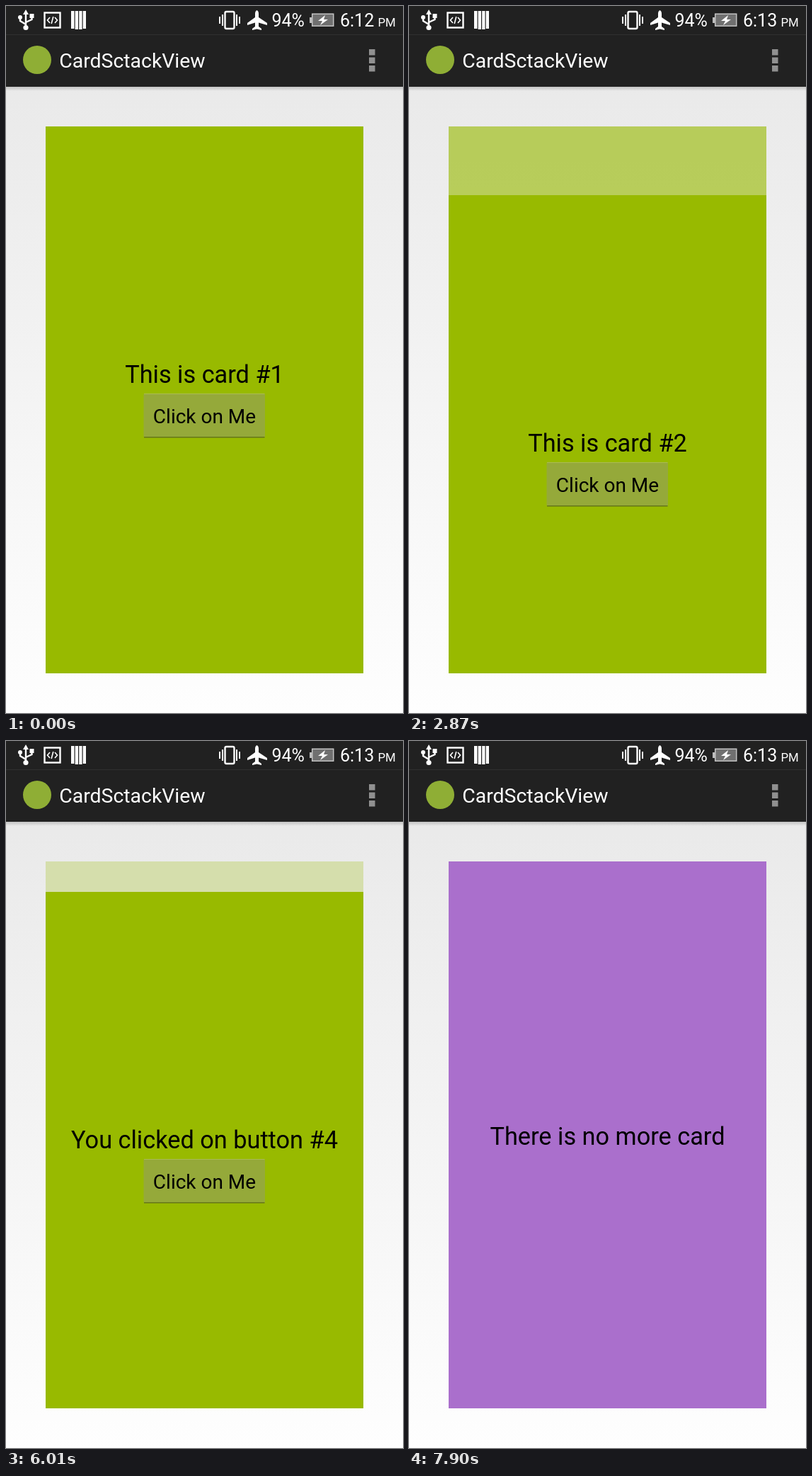
An HTML page for the animation above (9.15 s loop, 561 by 998 pixels).

```html
<!DOCTYPE html>
<html lang="en">
<head>
<meta charset="utf-8">
<title>Card stack</title>
<style>
  html, body { margin: 0; width: 100%; height: 100%; overflow: hidden; background: #fff; }
  svg { display: block; width: 561px; height: 998px; font-family: Roboto, "Noto Sans", sans-serif; }
  .label { font-size: 34.3px; text-anchor: middle; }
  .caption { font-size: 28px; text-anchor: middle; }
  .line { fill: none; stroke: #fff; stroke-width: 2.4; }
</style>
</head>
<body>
<svg viewBox="0 0 561 998">
  <defs>
    <linearGradient id="page" x2="0" y2="1">
      <stop stop-color="#e7e7e7"/><stop offset="1" stop-color="#fefefe"/>
    </linearGradient>
    <linearGradient id="shade" x2="0" y2="1">
      <stop stop-opacity=".17"/><stop offset="1" stop-opacity="0"/>
    </linearGradient>
    <clipPath id="stack"><rect x="56" y="170" width="449" height="772"/></clipPath>
    <g id="card">
      <rect x="56" y="170" width="449" height="772" fill="#98ba00"/>
      <text class="label" x="280.5" y="532"></text>
      <rect class="button" x="194.5" y="547" width="171.5" height="62" rx="2" fill="#95a93a"/>
      <path d="M195 547.5H365.5" stroke="#aabb55"/>
      <path d="M195 608.7H365.5" stroke="#66761c" stroke-width="1.4"/>
      <text class="caption" x="280.5" y="589">Click on Me</text>
    </g>
  </defs>

  <rect width="561" height="998" fill="url(#page)"/>
  <rect y="114" width="561" height="6" fill="url(#shade)"/>
  <rect width="561" height="114" fill="#212121"/>
  <path d="M0 40.5H561" stroke="#303030"/>

  <g fill="#fff">
    <!-- left status icons -->
    <path class="line" d="M28 10V29M28 26L20 21V17M28 23L36.5 19V14"/>
    <path d="M28 5L32 12H24ZM33.5 11H39.5V17H33.5Z"/>
    <circle cx="28" cy="30.500" r="3.6"/><circle cx="20" cy="16" r="3"/>
    <rect class="line" x="54.5" y="9.5" width="22" height="21"/>
    <path class="line" style="stroke-width:1.6" d="M62 16L58.5 20L62 24M69 16L72.5 20L69 24M66.8 15L64.2 25"/>
    <path d="M92 7H96.5V32H92ZM97.7 7H102V33H97.7ZM103.2 7H107.5V33H103.2ZM108.7 7H113V32H108.7Z"/>
    <!-- right status icons -->
    <rect class="line" x="309.5" y="8" width="13" height="24" rx="2"/>
    <path class="line" style="stroke-width:2" d="M302 15V25M306 12V28M326 12V28M330 15V25"/>
    <path d="M354.5 6Q357 7 357 11V16L369 24V27L357 23.500V29L361 32V34L354.5 32.5L348 34V32L352 29V23.5L341 27V24L352 16V11Q352 7 354.5 6Z"/>
    <path d="M429 16H432V24H429Z" fill="#bbb"/>
    <rect x="432.7" y="11.2" width="30" height="17" fill="#707070" stroke="#c4c4c4" stroke-width="1.5"/>
    <path d="M451 13L441 21H447L444 27L455 19H449Z"/>
    <g font-size="25">
      <text x="375.5" y="29">94%</text>
      <text id="clock" x="472" y="29">6:12</text>
      <text x="525.5" y="29" font-size="16.8">PM</text>
    </g>
    <!-- action bar -->
    <circle cx="44" cy="76" r="20" fill="#8fae35"/>
    <text x="75.3" y="87" font-size="28.4">CardSctackView</text>
    <path fill="#909090" d="M513 61H521.5V69.5H513ZM513 72.5H521.5V81H513ZM513 84H521.5V92.5H513Z"/>
  </g>

  <g clip-path="url(#stack)" id="cards"></g>
  <g id="empty">
    <rect x="56" y="170" width="449" height="772" fill="#aa6fcc"/>
    <text class="label" x="280.5" y="569.5">There is no more card</text>
  </g>
</svg>
<script>
const LOOP = 9150, HEIGHT = 772, SETTLE = 300, FADE = 158;
const CLOCK = 2430, PRESS = 4620, CLICK = 4750, EMPTY = 7870;
// start, end of the swipe and the distance dragged before release
const swipes = [
  [1590, 2480, 200],
  [2670, 3340, 274],
  [3580, 4460, 135],
  [5780, 6650, 200],
  [6990, 7850, 200]
];
const byId = id => document.getElementById(id);
const template = byId('card');

function makeCard() {
  const node = template.cloneNode(true);
  node.removeAttribute('id');
  byId('cards').append(node);
  return { node, label: node.querySelector('.label'), button: node.querySelector('.button') };
}
const back = makeCard(), front = makeCard();

function offsetAt(t, [start, end, reach]) {
  const release = end - SETTLE;
  if (t <= start) return 0;
  if (t < release) return reach * ((t - start) / (release - start)) ** 1.7;
  const u = Math.min(1, (t - release) / SETTLE);
  return reach + (HEIGHT - reach) * (1 - Math.cos(Math.PI * u)) / 2;
}

function fill(card, index, t) {
  const clickable = index === 3;
  card.label.textContent = clickable && t >= CLICK
    ? 'You clicked on button #4' : `This is card #${index + 1}`;
  card.button.setAttribute('fill',
    clickable && t >= PRESS && t < CLICK ? '#6eb08c' : '#95a93a');
}

function draw(t) {
  const next = swipes.findIndex(swipe => t < swipe[1]);
  const top = next < 0 ? swipes.length : next;
  const offset = top < swipes.length ? Math.round(offsetAt(t, swipes[top])) : HEIGHT;
  const hasNext = top + 1 < swipes.length;

  front.node.setAttribute('transform', `translate(0 ${offset})`);
  if (top < swipes.length) fill(front, top, t);
  back.node.setAttribute('opacity', hasNext ? Math.min(1, offset / FADE) : 0);
  if (hasNext) fill(back, top + 1, t);

  byId('clock').textContent = t < CLOCK ? '6:12' : '6:13';
  byId('empty').setAttribute('visibility', t < EMPTY ? 'hidden' : 'visible');
}

const origin = performance.now();
function tick() {
  draw((performance.now() - origin) % LOOP);
  requestAnimationFrame(tick);
}
tick();
</script>
</body>
</html>
```
